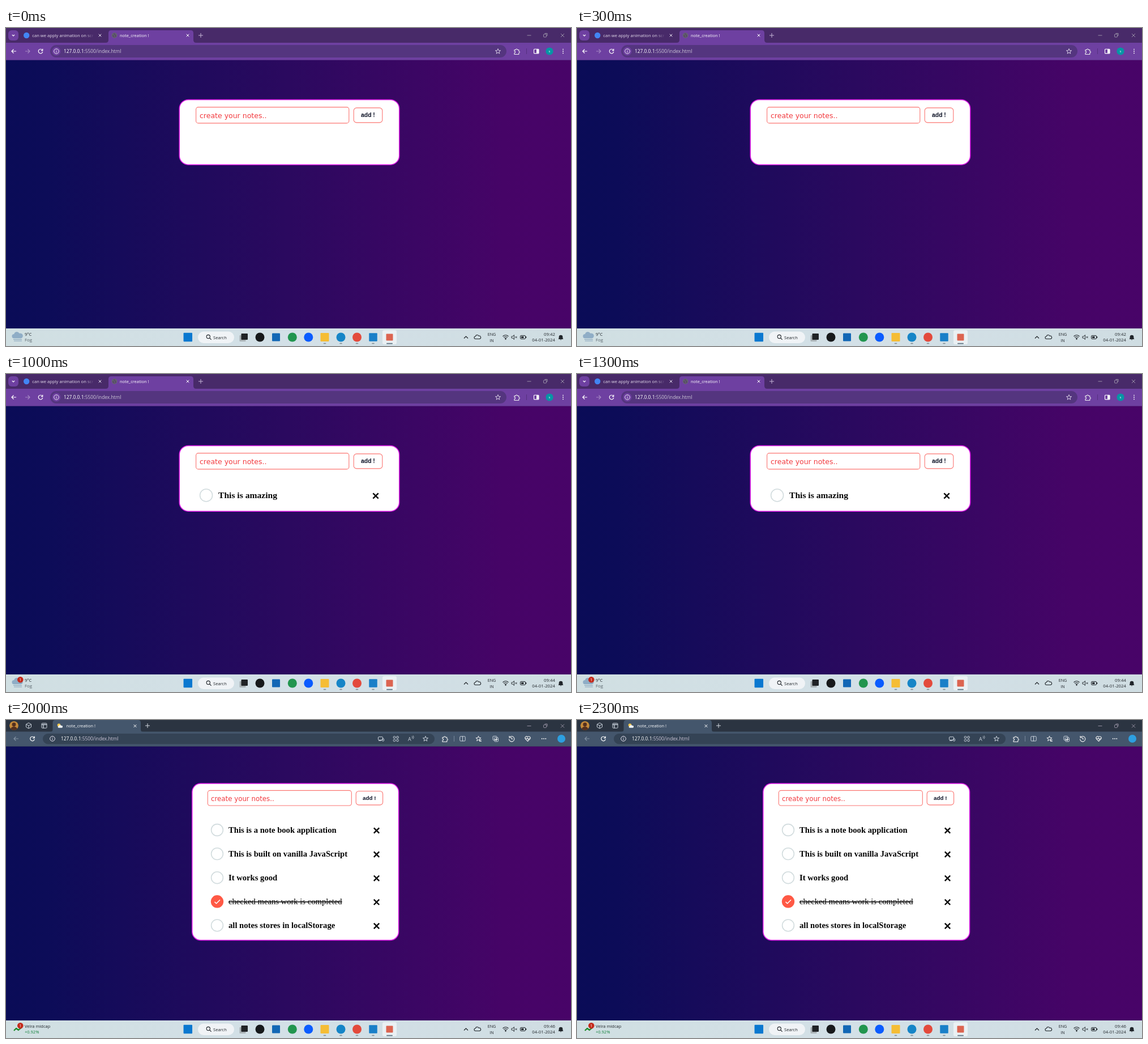
These frames come from a looping animation (998x561 px, 2500 ms). An HTML page:

```html
<!DOCTYPE html>
<html lang="en">
<head>
<meta charset="utf-8">
<title>Notes</title>
<style>
html, body { margin: 0; width: 100%; height: 100%; overflow: hidden; }
svg { display: block; width: 998px; height: 561px; }
</style>
</head>
<body>
<svg id="stage" viewBox="0 0 998 561"></svg>
<script>
const UI = "'Open Sans', sans-serif";
const SANS = "'Liberation Sans', sans-serif";
const SERIF = "'Liberation Serif', serif";
const WIDE = "'DejaVu Sans', sans-serif";

const rect = (x, y, w, h, fill, r = 0, extra = '') =>
  `<rect x="${x}" y="${y}" width="${w}" height="${h}" rx="${r}" fill="${fill}" ${extra}/>`;
const circle = (x, y, r, fill, extra = '') =>
  `<circle cx="${x}" cy="${y}" r="${r}" fill="${fill}" ${extra}/>`;
const line = (d, color, width = 1, fill = 'none') =>
  `<path d="${d}" fill="${fill}" stroke="${color}" stroke-width="${width}" stroke-linejoin="round"/>`;
const text = (x, y, content, size, fill = '#fff', font = UI, extra = '') =>
  `<text x="${x}" y="${y}" font-size="${size}" fill="${fill}" font-family="${font}" ${extra}>${content}</text>`;
const stroke = (color, width) => `stroke="${color}" stroke-width="${width}"`;
const cross = (x, y, r, color, width = 1) =>
  line(`M${x - r} ${y - r}l${2 * r} ${2 * r}m0 ${-2 * r}l${-2 * r} ${2 * r}`, color, width);
const plus = (x, y, color) => line(`M${x - 4} ${y}h8m-4-4v8`, color);
const arrow = (x, y, dir, color) =>
  line(`M${x - 4 * dir} ${y}h${8 * dir}m${-3.5 * dir}-3.5l${3.5 * dir} 3.5l${-3.5 * dir} 3.5`, color, 1.2);
const reload = (x, y) =>
  line(`M${x + 3} ${y - 2.4}a3.8 3.8 0 1 0 .8 3.2M${x + 3.8} ${y - 4.2}v3h-3`, '#fff', 1.2);
const info = (x, y) => circle(x, y, 4.3, 'none', stroke('#e8e4f0', 1)) +
  line(`M${x} ${y - .6}v3m0-5v1`, '#e8e4f0', 1);
const star = (x, y, color) => {
  const points = Array.from({ length: 10 }, (_, i) => {
    const r = i % 2 ? 2 : 4.8, a = i * Math.PI / 5;
    return [x + r * Math.sin(a), y - r * Math.cos(a)].join(' ');
  });
  return line(`M${points.join('L')}Z`, color, 1);
};
const puzzle = (x, y) =>
  line(`M${x - 4} ${y - 3}h2.4a1.5 1.5 0 0 1 3 0h2.4v2.5a1.5 1.5 0 0 1 0 3v2.5h-7.8v-2.4a1.6 1.6 0 0 0 0-3.2z`, '#eee', 1.1);
const dots = (x, y, dx, dy) => [-1, 0, 1].map(i => circle(x + i * dx, y + i * dy, .9, '#fff')).join('');
const cloud = (x, y, k, fill, extra = '') =>
  `<path transform="translate(${x} ${y}) scale(${k})" d="M-5 4a3 3 0 0 1 0-6a4 4 0 0 1 7.5-1a3.6 3.6 0 0 1 2.5 7z" fill="${fill}" ${extra}/>`;
const windowButtons = y => {
  const c = '#a29bad';
  return line(`M920.5 ${y}h7`, c, .9) + rect(949.5, y - 2, 5, 5, 'none', 1, stroke(c, .9)) +
    line(`M951.5 ${y - 3.5}h4.5v4.5`, c, .9) + cross(983, y, 3, c, .9);
};
const address = (x, y) =>
  text(x, y, '127.0.0.1<tspan fill="#cbc5d6">:5500/index.html</tspan>', 8.4);
const page = top => rect(0, top, 998, 530 - top, 'url(#page)');

function purpleBrowser() {
  return rect(0, 0, 998, 56.5, '#482a69') + rect(0, 26, 998, 30.5, '#6e40a1') +
    rect(4, 4, 18, 18, '#6e40a1', 6) + line('M10.8 11.8l2.2 2.2l2.2-2.2', '#fff', 1.2) +
    circle(36.2, 13, 5.2, '#4285f4') +
    text(46.3, 16, 'can we apply animation on scr', 7.65, '#e4dcec') +
    rect(140, 5, 16, 17, 'url(#fade)') + cross(166, 13, 2.3, '#e8e0f0') +
    `<path d="M176 26q5 0 5-5V9q0-5 5-5h140q5 0 5 5v12q0 5 5 5z" fill="#6e40a1"/>` +
    circle(191.5, 13, 4.2, '#59486a', stroke('#65736a', 1)) + line('M188 11l3 1l1 4m1-6l2 3', '#65736a', 1) +
    text(201, 16, 'note_creation !', 7.45) + cross(321, 13, 2.3, '#fff') + plus(344, 13, '#c7b6d8') +
    windowButtons(13) +
    arrow(14, 41, -1, '#fff') + arrow(38, 41, 1, '#a588c4') + reload(61, 41) +
    rect(78, 30, 806, 22, '#54357f', 11) + circle(89, 41, 7.5, '#6e40a1') + info(89, 41) +
    address(102, 44.3) + star(869, 41.3, '#d8cde5') + puzzle(902, 41.5) +
    line('M919.5 36v10', '#55307f', 1) +
    rect(932.5, 37.3, 8.5, 7.6, 'none', 1, stroke('#fff', 1.1)) + rect(937, 37.5, 4, 7, '#fff') +
    circle(960, 41, 6.6, '#0795a5') + text(960, 43, 's', 6, '#fff', UI, 'text-anchor="middle"') +
    dots(984, 41, 0, 3.4);
}

function slateBrowser() {
  const c = '#c8d0da';
  const box = (x, y, w, h) => rect(x - w / 2, y - h / 2, w, h, 'none', 1.2, stroke(c, 1));
  return rect(0, 0, 998, 46.5, '#2b3441') + rect(0, 20.5, 998, 26, '#44566c') +
    `<clipPath id="face"><circle cx="14" cy="10" r="8"/></clipPath>` +
    `<g clip-path="url(#face)">${circle(14, 10, 8, '#c58a3a') + circle(14, 8, 3.4, '#54301f') +
      circle(14, 18, 6.5, '#54301f')}</g>` +
    line('M40 5l4.5 2.5v5L40 15l-4.5-2.5v-5zM35.5 7.5L40 10l4.5-2.5M40 10v5', c) +
    box(67.5, 10, 9, 8.5) + line('M63 8h9m-6 0v6', c, 1.3) +
    `<path d="M78 21q4.500 0 4.500-4.500V5q0-5 5-5h145.500q5 0 5 5v11.500q0 4.500 4.500 4.500z" fill="#44566c"/>` +
    circle(93.5, 9, 2.8, '#f4c84c') + cloud(96, 11.6, .55, '#eef3f7') +
    text(106.5, 13, 'note_creation !', 7.45) + cross(228, 10.5, 2.4, '#fff') + plus(250, 10, '#d6dbe2') +
    windowButtons(10.5) +
    arrow(18, 33, -1, '#8291a2') + reload(46.5, 33) +
    rect(65, 24, 692, 18.5, '#344355', 9.2) + info(82, 33) + address(97, 36.2) +
    box(661.5, 32.5, 8, 5.5) + line('M658 36.500h5', c) + box(666, 35, 3, 4.5) +
    [686, 691.5].map(x => box(x, 30.5, 3.5, 3.5) + box(x, 36, 3.5, 3.5)).join('') +
    text(710, 36.5, 'A', 9, c) + line('M717 28.500q2 1.500 0 4m2-5q2.500 2.500 0 6', c, .8) +
    star(741, 33.3, c) + puzzle(775, 33.5) + line('M791.5 28v10', '#77879a') +
    box(806.5, 33, 9.5, 8) + line('M806.500 28.500v9', c) +
    star(834.5, 33, '#eee') + line('M835 35h5m-4 2.500h4', '#eee', 1.1) +
    box(863.5, 32, 7, 7) + box(866, 34.5, 7, 7) + line('M863.500 34.500h5m-2.500-2.500v5', '#eee') +
    line('M889.500 30.500a4.700 4.700 0 1 1-1 3M889 28v3h3m1-.500v3h2.500', '#eee', 1.1) +
    line('M921.500 37.500l-4-4.200a2.500 2.500 0 0 1 4-3.300a2.500 2.500 0 0 1 4 3.300zM917 33h3l1-1.500l1.500 3l1-1.500h3', '#eee', 1.1) +
    dots(950, 33, 3.3, 0) + circle(981, 33, 7, '#2d9fe0');
}

// Geometry of the card at full size and in the smaller window
const large = {
  card: [306.2, 126.4, 388.5], radius: 16, input: [335.6, 139.6, 270.2, 28.3],
  button: [614.2, 140.9, 50.6, 26], field: [342, 159, 12.5], add: [627, 157.3, 10.4],
  check: 353.6, label: 375, remove: 653, firstRow: 214, r: 11, size: 15.6
};
const small = {
  card: [328.8, 112.1, 364.8], radius: 15, input: [356.3, 124.4, 254, 26.6],
  button: [618.2, 125.5, 47.4, 24.4], field: [362, 142.6, 11.8], add: [630, 140.8, 9.8],
  check: 373, label: 393, remove: 654.5, firstRow: 194, r: 10.4, size: 14.63
};

function card(g, height, typed, notes) {
  const [fx, fy, fs] = g.field, [ax, ay, as] = g.add;
  const outline = (box, r) => rect(...box, '#fff', r, stroke('#fb7672', 1.1));
  const rows = notes.map((note, i) => {
    const y = g.firstRow + i * 42.1, done = note.startsWith('checked');
    return circle(g.check, y, g.r, done ? '#ff5945' : '#fff', stroke(done ? '#ff5945' : '#d2dcde', 1.6)) +
      (done ? line(`M${g.check - 4.500} ${y + .5}l3 3l6.500-6.500`, '#fff', 1.5) : '') +
      text(g.label, y + 4.9, note, g.size, '#050505', SERIF,
        done ? 'text-decoration="line-through"' : 'font-weight="700"') +
      cross(g.remove, y + 1, 4.7, '#080808', 2.4);
  }).join('');
  return rect(...g.card, height, '#fff', g.radius, stroke('#dc18e6', 1.5)) +
    outline(g.input, 4) + outline(g.button, 5) +
    text(fx, fy, typed || 'create your notes..', fs, typed ? '#111' : '#f23a3f', WIDE) +
    text(ax, ay, 'add !', as, '#0b1024', SANS, 'font-weight="700"') + rows;
}

const alertBar = () => rect(0, 56.5, 998, 30, '#ff2828') +
  text(385, 76.5, 'input field can not be empty !', 15.6, '#fff', SERIF, 'font-weight="700" letter-spacing="1.17"');

function taskbar({ clock, market, badge }) {
  const ink = '#20252a';
  const square = (x, size, color) => rect(x - size / 2, 545.5 - size / 2, size, size, color, 1);
  const widget = market
    ? line('M14 548l4-4l4 3l6-5', '#1d8a2b', 2.2) + text(33, 543, 'Velra midcap', 7.5, ink) +
      text(33, 553.3, '+0.92%', 7.5, '#12813a')
    : cloud(20.5, 542.5, 1.25, '#8fadc6') + line('M13 549.500h15m-14 2.500h14', '#86a4bb', 1.1) +
      text(33, 543, '9°C', 7.6, ink) + text(33, 553.3, 'Fog', 7.8, '#59646b');
  const right = (y, s) => text(970, y, s, 7.8, ink, UI, 'text-anchor="end"');
  const mid = (y, s) => text(858, y, s, 7.2, ink, UI, 'text-anchor="middle"');
  return rect(0, 530, 998, 31, 'url(#bar)') + widget +
    (badge ? circle(25.3, 539.2, 5.3, '#c42b1c') + text(25.3, 541.7, '1', 6.8, '#fff', UI, 'text-anchor="middle"') : '') +
    square(321.3, 15.5, '#0a78d0') +
    rect(339, 535.5, 64, 20.5, '#f0f3f6', 10.2) + circle(357.3, 544.5, 3.1, 'none', stroke(ink, 1.1)) +
    line('M359.600 546.800l3 3', ink, 1.2) + text(366, 548.5, 'Search', 7.6, ink) +
    rect(412.5, 542, 11, 11, '#a9b1b5', 1) + rect(415.5, 539, 11.5, 11, '#202326', 1) +
    circle(448.5, 545.5, 8, '#17191b') + square(477, 14, '#1267b5') +
    circle(505.8, 545.5, 8, '#22954f') + circle(534.3, 545.5, 8, '#0b5cff') +
    square(563, 15, '#f5bd35') + circle(591.5, 545.5, 8, '#1685c7') +
    circle(620, 545.5, 8, '#e34a3c') + square(648.5, 14.5, '#197fc8') +
    rect(665, 533, 25, 25, '#eaf0f3', 3) + square(677.5, 12, '#dc6450') +
    [563, 591.5, 620, 648.5].map(x => rect(x - 2.3, 555.7, 4.6, 1.6, '#7c878d', .8)).join('') +
    rect(672, 555.7, 11, 1.8, '#5d7282', .9) +
    line('M809 547.500l3.500-3.500l3.500 3.500', ink, 1.1) + cloud(833, 545.5, .75, 'none', stroke(ink, 1.4)) +
    mid(543, 'ENG') + mid(553.5, 'IN') +
    line('M877.500 544q5-4.500 10 0m-8.200 2q3.200-3 6.400 0m-4.700 1.800q1.500-1.300 3 0', ink, 1.1) + circle(882.5, 549, 1, ink) +
    line('M893 544h2l2.500-2.500v8l-2.500-2.500h-2z', ink, .9) + cross(901, 545.5, 1.5, ink, .9) +
    rect(908.5, 542.5, 9, 6, 'none', 1.5, stroke(ink, 1)) + rect(910, 544, 4.5, 3, ink) + rect(918, 544.3, 1.3, 2.5, ink) +
    right(543, clock) + right(553.3, '04-01-2024') +
    `<path d="M975.500 549q1.200-1 1.200-4a3.300 3.300 0 0 1 6.600 0q0 3 1.200 4zM978.500 549.500h3q-1.500 2-3 0z" fill="${ink}"/>`;
}

const amazing = 'This is amazing';
const notes = ['This is a note book application', 'This is built on vanilla JavaScript', 'It works good',
  'checked means work is completed', 'all notes stores in localStorage'];
const states = [
  { clock: '09:42' },
  { clock: '09:44', typed: amazing },
  { clock: '09:44', list: [amazing], badge: true },
  { clock: '09:45', list: [amazing], badge: true, market: true, alert: true },
  { clock: '09:46', list: notes, badge: true, market: true, slate: true }
];

const gradient = (id, ...stops) => `<linearGradient id="${id}">${stops.map(([at, color, alpha = 1]) =>
  `<stop offset="${at}" stop-color="${color}" stop-opacity="${alpha}"/>`).join('')}</linearGradient>`;
const defs = gradient('page', [0, '#0a0c57'], [.07, '#0c0c58'], [.5, '#2b095f'], [.88, '#460467'], [1, '#480468']) +
  gradient('fade', [0, '#482a69', 0], [1, '#482a69']) +
  gradient('bar', [0, '#d0dfe2'], [.5, '#d3e0e7'], [1, '#cfdde2']);

function draw(s) {
  const list = s.list || [];
  return defs + page(s.slate ? 46 : 56) + (s.slate ? slateBrowser() : purpleBrowser()) +
    (s.alert ? alertBar() : '') +
    card(s.slate ? small : large, s.slate ? 276.4 : list.length ? 115.8 : 114.8, s.typed, list) +
    taskbar(s);
}

const stage = document.getElementById('stage');
const scenes = states.map(draw);
let shown = -1;
function tick(now) {
  const current = Math.floor(now % 2500 / 500);
  if (current !== shown) stage.innerHTML = scenes[shown = current];
  requestAnimationFrame(tick);
}
tick(performance.now());
</script>
</body>
</html>
```
